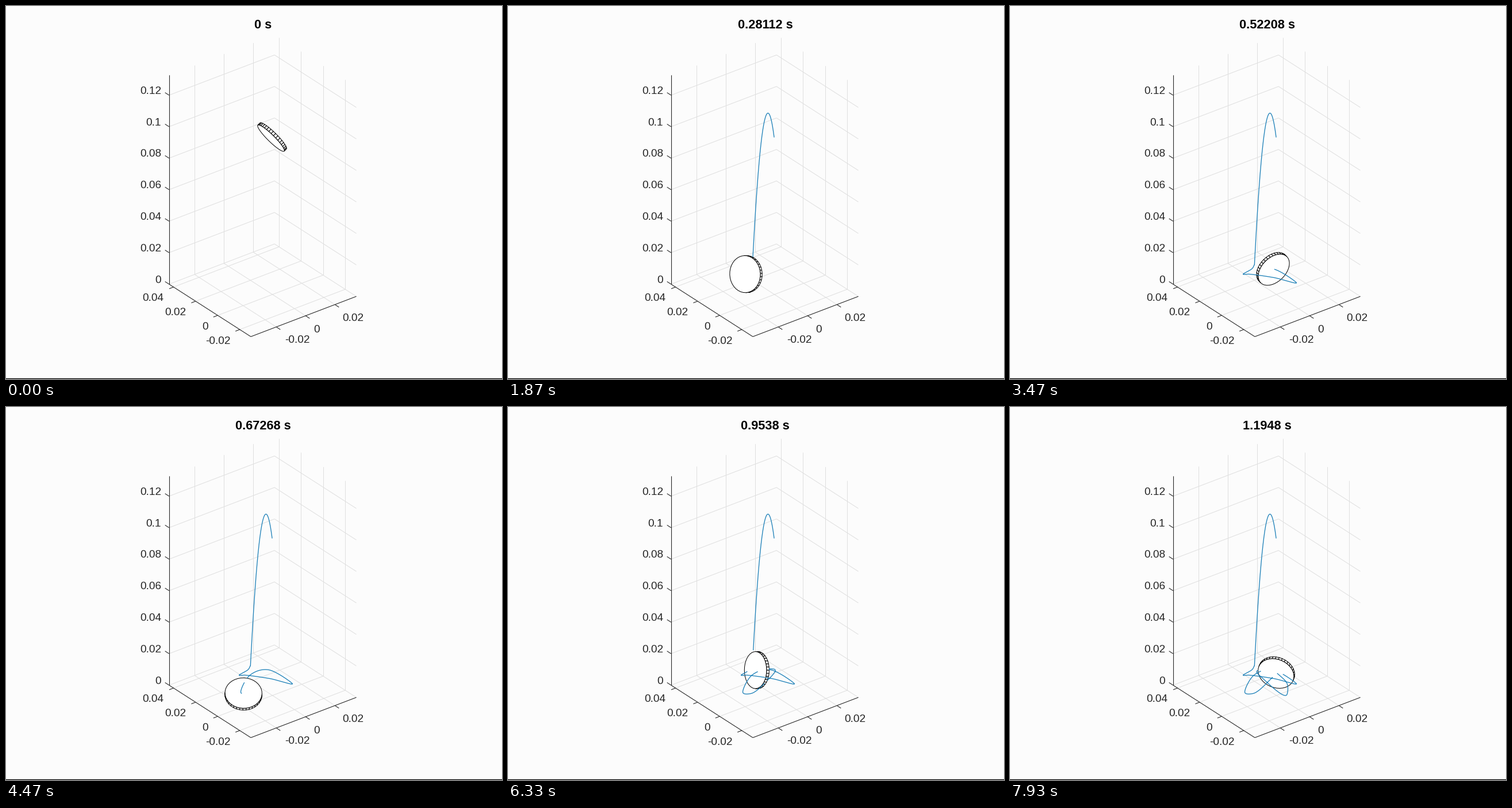
These frames come from a looping animation (863 by 649 pixels, 7.96 s). A matplotlib script:

```python
import numpy as np
import matplotlib.pyplot as plt
from matplotlib.animation import FuncAnimation
from matplotlib.collections import LineCollection, PolyCollection

W, H, DPI = 863, 649, 64
PX = 72 / DPI                      # one pixel in points
INK, GRID, BLUE, PAPER = "#262626", "#dfdfdf", "#1c80b8", "#fcfcfc"
STEPS, DT, SUB = 238, 0.00502, 4   # simulation steps, seconds per step, trace samples per step
FRAMES, INTERVAL = 398, 20
RADIUS, HALF, SIDES = 32.2, 2.8, 36
HIT = 39                           # step of the first impact
SIN, COS = 0.5, 0.866              # camera elevation of 30 degrees
FLOOR_Y = 501.5                    # screen height of the floor below the start

plt.rcParams["font.family"] = "Liberation Sans"
fig = plt.figure(figsize=(W / DPI, H / DPI), dpi=DPI, facecolor=PAPER)
ax = fig.add_axes([0, 0, 1, 1])
ax.set(xlim=(0, W), ylim=(H, 0))
ax.axis("off")


def hermite(t, keys, points):
    """Smooth curve through points given at uneven times."""
    slope = np.gradient(points, keys, axis=0)
    i = np.clip(np.searchsorted(keys, t, side="right") - 1, 0, len(keys) - 2)
    h = (keys[i + 1] - keys[i])[:, None]
    s = (t - keys[i])[:, None] / h
    return ((1 + 2 * s) * (1 - s) ** 2 * points[i] + s * (1 - s) ** 2 * h * slope[i]
            + s * s * (3 - 2 * s) * points[i + 1] + s * s * (s - 1) * h * slope[i + 1])


# Axes box
LEFT, FRONT, RIGHT = (np.array(p) for p in ((283.7, 484), (426, 575.3), (609.5, 505.3)))
BACK = LEFT + RIGHT - FRONT
X_DIR, Y_DIR, UP = RIGHT - FRONT, LEFT - FRONT, np.array([0, -364.5])
x_at = (44.3 + 51 * np.arange(3)) / X_DIR[0]
y_at = (19.3 + 38.4 * np.arange(4)) / -Y_DIR[0]
z_at = [np.array([0, -54.8 * i]) for i in range(7)]

grid = []
for f in x_at:
    foot = LEFT + f * X_DIR
    grid += [(foot, foot + UP), (foot, foot - Y_DIR)]
for f in y_at:
    foot = RIGHT + f * Y_DIR
    grid += [(foot, foot + UP), (foot, foot - X_DIR)]
for z in z_at:
    grid += [(LEFT + z, BACK + z), (BACK + z, RIGHT + z)]
ax.add_collection(LineCollection(grid, colors=GRID, linewidths=PX, zorder=1))

frame_lines = [(LEFT + UP, LEFT), (LEFT, FRONT), (FRONT, RIGHT)]
for anchors, tick in (([LEFT + z for z in z_at], (-7, -4.5)),
                      ([FRONT + f * Y_DIR for f in y_at], (-7.5, 2.9)),
                      ([FRONT + f * X_DIR for f in x_at], (7, 4.6))):
    frame_lines += [(p, p + tick) for p in anchors]
ax.add_collection(LineCollection(frame_lines, colors=INK, linewidths=1.1 * PX, zorder=2))
ax.plot([0, W], [648.2, 648.2], color="black", lw=1.4 * PX, zorder=2)


def labels(start, step, values, align):
    for i, value in enumerate(values):
        ax.text(start[0] + i * step[0], start[1] + i * step[1], f"{value / 100:g}",
                size=19 * PX, color=INK, ha=align, va="baseline")


labels((270, 481.5), (0, -54.8), range(0, 14, 2), "right")
labels((274, 513.3), (39, 24.8), range(4, -4, -2), "right")
labels((485, 586.5), (50.3, -19), range(-2, 4, 2), "left")
title = ax.text(447.5, 38.8, "", size=21.7 * PX, weight="bold", color="black",
                ha="center", va="baseline")

# Step, then the coin axis as seen on screen: right, up
tilt = np.array([(0, -.69, -.70), (29, -.06, .98), (68, -.60, -.30), (82, -.20, .08),
                 (104, .54, -.54), (134, .02, .57), (190, -.80, 0), (238, -.25, -.60)])
# Step, then the coin centre at the turns of its path on the floor
roll = np.array([(HIT, 425.3, 450), (45, 420, 458), (50, 406, 466), (57, 416, 466.5),
                 (74, 459, 472.5), (91, 498, 481), (104, 457.5, 457.4), (117, 424, 467),
                 (129, 408.5, 496), (140, 423, 498.5), (157, 448, 479), (174, 464, 456.5),
                 (183, 447, 456), (193, 429.5, 459.5), (204, 439, 471.5), (223, 482, 500),
                 (230, 482, 481), (238, 463.5, 462)])

time = np.arange(STEPS * SUB + 1) / SUB
air = time <= HIT

lean = hermite(time, tilt[:, 0], tilt[:, 1:])
lean *= np.minimum(1, .985 / np.maximum(np.hypot(*lean.T), 1e-6))[:, None]
normal = np.column_stack([lean, np.sqrt(1 - (lean ** 2).sum(axis=1))])

fall = np.column_stack([463 - .966 * time, 228 - 7.51 * time + .3387 * time ** 2])
centre = np.where(air[:, None], fall, hermite(time, roll[:, 0], roll[:, 1:]))

# Depth follows from the height of a tilted disc touching the floor
rise = FLOOR_Y - centre[:, 1]
nz = normal[:, 1] * COS + normal[:, 2] * SIN
height = RADIUS * np.sqrt(np.clip(1 - nz ** 2, 0, 1)) + HALF * abs(nz)
away = (rise - COS * height) / SIN
away[air] = away[HIT * SUB] * time[air] / HIT
height[air] = (rise[air] - SIN * away[air]) / COS
space = np.column_stack([centre[:, 0], -centre[:, 1], SIN * height - COS * away])

angle = np.linspace(0, 2 * np.pi, SIDES, endpoint=False)[:, None]
coin = PolyCollection([], facecolors="white", edgecolors="black",
                      linewidths=PX, zorder=3)
ax.add_collection(coin)
trace, = ax.plot([], [], color=BLUE, lw=1.3 * PX, zorder=4)


def coin_faces(c, n):
    """Visible side quads, then the lid that faces the viewer."""
    e1 = np.cross(n, (0, 0, 1))
    e1 /= np.linalg.norm(e1)
    out = np.cos(angle) * e1 + np.sin(angle) * np.cross(n, e1)
    lid, base = (c + (RADIUS * out + s * HALF * n)[:, :2] * (1, -1) for s in (1, -1))
    sides = [[lid[i - 1], lid[i], base[i], base[i - 1]] for i in range(SIDES)
             if out[i - 1, 2] + out[i, 2] > 0]
    return sides + [lid]


def hidden(points, c, n):
    """True where the coin lies between a point and the viewer."""
    rel = points - c
    covered = np.zeros(len(rel), bool)
    for offset in (HALF, -HALF):
        s = (offset - rel @ n) / n[2]
        radial = np.linalg.norm(rel + np.outer(s, (0, 0, 1)) - offset * n, axis=1)
        covered |= (s > 0) & (radial <= RADIUS)
    return covered


def update(frame):
    k = min(round(.6 * frame + .3), STEPS)
    i = k * SUB
    title.set_text(f"{k * DT:.5g} s")
    coin.set_verts(coin_faces(centre[i], normal[i]))
    path = centre[:i + 1].copy()
    path[hidden(space[:i + 1], space[i], normal[i])] = np.nan
    trace.set_data(path[:, 0], path[:, 1])
    return title, coin, trace


anim = FuncAnimation(fig, update, frames=FRAMES, interval=INTERVAL,
                     repeat=True, repeat_delay=0, blit=False)
plt.show()
```
